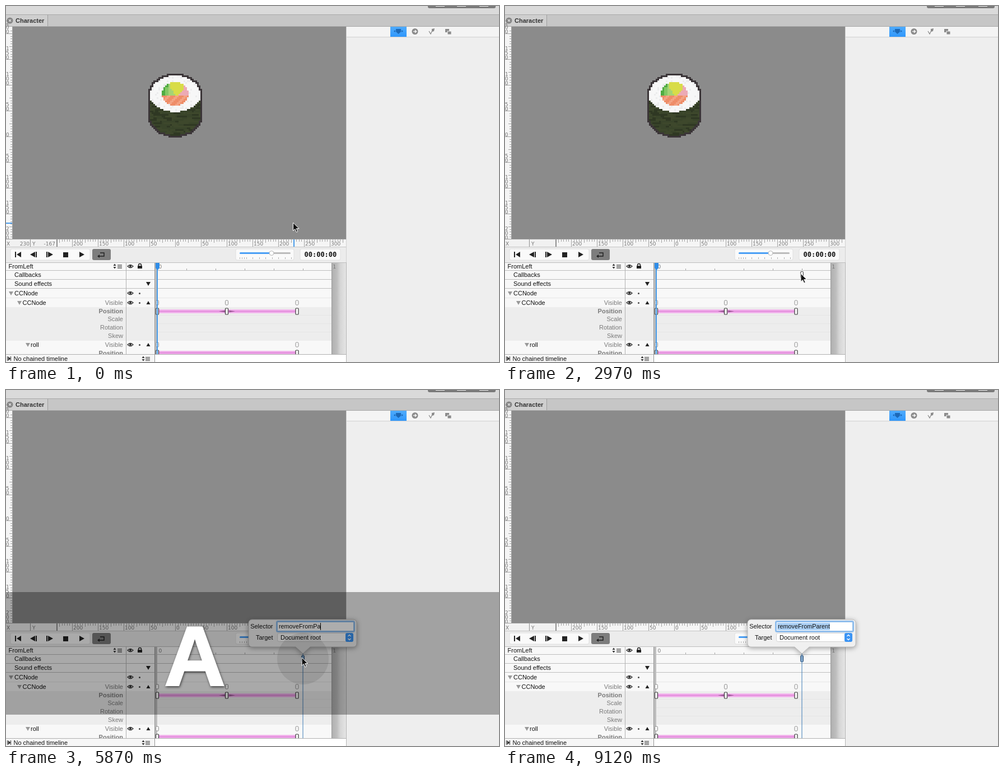
Write an HTML page that moves like this. It is 880 by 636 pixels and loops after 9900 ms.

```html
<!DOCTYPE html>
<html lang="en">
<head>
<meta charset="utf-8">
<title>Timeline callback</title>
<style>
html, body { margin: 0; width: 100%; height: 100%; overflow: hidden; background: #eee; }
svg { display: block; width: 880px; height: 636px; }
text { font-family: "Liberation Sans", Arial, sans-serif; font-size: 11px; fill: #111; white-space: pre; }
.num { font: 9px "DejaVu Sans", sans-serif; fill: #777; }
.clock { font: bold 12px "DejaVu Sans Mono", monospace; fill: #111; }
.prop { fill: #7b7b7b; }
.key { font-size: 151px; font-weight: bold; fill: #fff; stroke: #fff; stroke-width: 3; }
</style>
</head>
<body>
<svg id="stage" viewBox="0 0 880 636"></svg>
<script>
const LOOP = 9900;
const stage = document.getElementById('stage');

const rect = (x, y, w, h, fill, more = '') =>
  `<rect x="${x}" y="${y}" width="${w}" height="${h}" fill="${fill}" ${more}/>`;
const path = (d, fill, more = '') => `<path d="${d}" fill="${fill}" ${more}/>`;
const line = (d, color, w = 1) => path(d, 'none', `stroke="${color}" stroke-width="${w}"`);
const dot = (x, y, r, fill, more = '') => `<circle cx="${x}" cy="${y}" r="${r}" fill="${fill}" ${more}/>`;
const text = (x, y, s, more = '') => `<text x="${x}" y="${y}" ${more}>${s}</text>`;
const END = 'text-anchor="end"';
const range = (a, b) => Array.from({ length: b - a + 1 }, (_, i) => a + i);

function randomizer(seed) {
  return () => (seed = (seed * 16807) % 2147483647) / 2147483647;
}

// Pixel-art sushi roll, 3px cells
function sushi() {
  const rnd = randomizer(77);
  const oval = (x, y, cx, cy, rx, ry) => ((x - cx) / rx) ** 2 + ((y - cy) / ry) ** 2 < 1;
  const solid = (x, y) => Math.abs(x - 302) < 48 &&
    (y < 157 ? oval(x, y, 302, 157, 48.5, 36) : y < 198 || oval(x, y, 302, 198, 48.5, 36.5));
  const around = [-3, 0, 3];
  const edge = (x, y) => around.some(dx => around.some(dy => !solid(x + dx, y + dy)));
  const filling = (x, y) => {
    if (y > 160) return (x + y) % 15 < 4 ? '#f3a384' : '#ee8d68';
    if (Math.abs(x - 306) < 12 - Math.max(0, y - 147) * 0.75) return '#d8dc48';
    if (x > 306) return '#ecaab5';
    return x < 284 || (x < 291 && y < 146) ? '#4fac42' : x < 291 ? '#82c763' : '#a5d375';
  };
  let out = '', wet = 0;
  for (let y = 122.5; y < 235; y += 3) {
    for (let x = 255.5; x < 350; x += 3) {
      if (!solid(x, y)) continue;
      const r = rnd();
      if (r < 0.35) wet = Math.floor(rnd() * 3);
      let c = ['#39442a', '#2f3823', '#3e482c'][wet];
      if (edge(x, y)) c = '#3b3538';
      else if (oval(x, y, 302, 157, 24, 21)) c = filling(x, y);
      else if (oval(x, y, 302, 156, 47, 33)) c = r < 0.15 ? '#ececed' : '#f7f7f7';
      out += rect(x - 1.5, y - 1.5, 3, 3, c);
    }
  }
  return `<g id="sushi" shape-rendering="crispEdges">${out}</g>`;
}

function topBars() {
  return rect(0, 0, 880, 636, '#eee') + rect(0, 0, 880, 15, '#dadada') +
    rect(753, -6, 121, 10, '#7a7a7a', 'rx="3"') +
    [767, 805, 845].map(x => rect(x, 0, 16, 1, '#eee')).join('') +
    rect(0, 15, 880, 1, '#a9a9a9') + rect(0, 16, 880, 20, '#c6c6c6') +
    rect(0, 16, 74, 20, '#cfcfcf') + rect(74, 16, 1, 20, '#9f9f9f') + rect(0, 36, 880, 1, '#a8a8a8') +
    dot(7, 26, 5.5, '#858585') + line('M5 24l4 4m0-4l-4 4', '#ddd', 1.4) +
    text(17, 30, 'Character', 'font-weight="bold" style="fill:#333"');
}

function sidePanel() {
  return rect(607, 37, 273, 18, '#f4f4f4') + rect(607, 55, 273, 1, '#d0d0d0') +
    rect(607, 37, 1, 599, '#d2d2d2') + rect(686, 37, 29, 18, 'url(#tab)') +
    path('M696 41h9v5l-4.500 4l-4.500-4z', '#1c69b8') + path('M692 45l3-2v4zM709 45l-3-2v4z', '#1c69b8') +
    dot(730, 45.5, 5.5, '#8a8a8a') + line('M727 45.500h5m-2-2.500l2.500 2.500l-2.500 2.500', '#f4f4f4', 1.5) +
    line('M755 45l3 5l4-8', '#8a8a8a', 1.3) + path('M760 41l5-1l-1 5l-4 1z', '#8a8a8a') +
    rect(784, 41, 7, 6, '#8a8a8a') + rect(788, 45, 7, 6, '#8a8a8a', 'stroke="#f4f4f4"');
}

function rulers() {
  let s = rect(0, 37, 11, 379, '#f5f5f5') + rect(11, 37, 1, 379, '#a5a5a5');
  for (const k of range(-41, 39)) {
    const y = Math.round(233 + k * 4.6);
    if (y < 38 || y > 415) continue;
    const len = k % 10 === 0 ? 11 : k % 5 === 0 ? 5 : 3;
    s += rect(11 - len, y, len, 1, '#a2a2a2');
  }
  for (const k of range(-4, 4)) {
    const digits = String(Math.abs(k * 50));
    [...digits].forEach((c, i) => {
      s += text(0, 233 + k * 46 - (digits.length - 1 - i) * 7.8, c, 'class="num"');
    });
  }
  s += rect(0, 416, 607, 15, '#f5f5f5') + rect(0, 416, 607, 1, '#9c9c9c') + rect(0, 430, 607, 1, '#c4c4c4');
  for (const k of range(-45, 65)) {
    const x = Math.round(302 + k * 4.6);
    if (x < 92 || x > 605) continue;
    s += rect(x, 417, 1, k % 10 === 0 ? 13 : k % 5 === 0 ? 6 : 4, '#a2a2a2');
  }
  for (const k of range(-4, 6)) s += text(304 + k * 46, 428, Math.abs(k * 50), 'class="num"');
  return s + rect(0, 417, 91, 13, '#f1f1f1') + rect(43, 417, 1, 13, '#8f8f8f') + rect(90, 417, 2, 13, '#8f8f8f') +
    text(1, 428, 'X', 'class="num"') + text(47, 428, 'Y', 'class="num"') +
    `<g id="readout"><text id="rx" class="num" x="42" y="428" ${END}></text>` +
    `<text id="ry" class="num" x="88" y="428" ${END}></text>` +
    rect(0, 0, 11, 2, '#4a9ceb', 'id="markY"') + rect(0, 417, 2, 13, '#4a9ceb', 'id="markX"') + '</g>';
}

function controls() {
  const ink = '#222';
  const box = (x, w) => rect(x, 434, w, 20, '#fafafa', 'rx="3" stroke="#e0e0e0"');
  let s = rect(0, 431, 607, 27, '#ececec') + box(8, 142) +
    rect(154, 434, 33, 20, '#7d7d7d', 'rx="3"') +
    line('M166 447h9v-6h-7', '#222', 1.5) + path('M163 447l4-3v6z', ink) +
    rect(16, 439, 2, 10, ink) + path('M27 439v10l-8-5z', ink) +
    path('M52 439v10l-9-5z', ink) + rect(53, 439, 2, 10, ink) +
    rect(72, 439, 2, 10, ink) + path('M75 439v10l9-5z', ink) +
    rect(102, 440, 9, 9, ink) + path('M131 439v10l9-5z', ink) +
    box(410, 104) + rect(417, 440, 57, 3, '#4a9ff5', 'rx="1.5"') + rect(474, 440, 34, 3, '#bcbcbc', 'rx="1.5"');
  for (const i of range(0, 8)) s += rect(417 + Math.round(i * 11.5), 449, 1, 3, '#b0b0b0');
  for (const i of range(1, 2)) s += rect(417 + i * 4, 449, 1, 3, '#b0b0b0');
  return s + dot(474, 441.5, 4, '#fff', 'stroke="#b5b5b5"') + box(525, 72) + text(532.5, 448, '00:00:00', 'class="clock"');
}

const eye = y => line(`M217 ${y}q5-5 10 0q-5 5-10 0z`, '#333', 1.3) + dot(222, y - 0.3, 2, '#333');
const stepper = (x, y) => path(`M${x - 2.5} ${y - 1}h5l-2.500-3.500zM${x - 2.5} ${y + 1}h5l-2.500 3.500z`, '#333');
const menu = (x, y) => [-3, -1, 1, 3].map(d => rect(x - 4, y + d, 8, 1, '#555')).join('');
const arrowDown = (x, y, c) => path(`M${x - 4} ${y - 3}h8l-4 7z`, c);
const arrowUp = (x, y) => path(`M${x - 3.5} ${y + 3}h7l-3.500-6z`, '#222');
const hollow = (x, y) => rect(x - 2.5, y - 4, 5, 8, '#fafafa', 'rx="1.5" stroke="#8d8d8d"');
const keyframe = (x, y) => rect(x - 2.5, y - 5.5, 5, 11, '#fff', 'rx="1" stroke="#3a3a3a" stroke-width="1.2"');
const tween = y => rect(270, y, 250, 7, '#f3b9ee') + rect(270, y + 2, 250, 3, '#e795e0');

function timeline() {
  const sep = y => rect(0, y, 607, 1, '#bdbdbd');
  let s = rect(0, 458, 607, 164, '#f8f8f8') + rect(0, 538, 607, 60, '#ededed');
  for (const y of [552, 567, 582]) s += rect(266, y, 341, 1, '#e5e5e5');
  s += [458, 472, 488, 504].map(sep).join('') + rect(0, 521, 607, 1, '#e6e6e6');
  s += rect(582, 459, 25, 163, 'url(#past)') + rect(581, 459, 1, 163, '#9a9a9a');
  s += rect(214, 459, 1, 163, '#b2b2b2') + rect(265, 459, 1, 163, '#979797') + rect(266, 459, 4, 163, '#bebebe');
  s += text(4.5, 469, 'FromLeft') + stepper(194, 465) + menu(203, 465) + eye(465) +
    rect(235, 464, 8, 5, '#222') + line('M236.500 464v-1a2.500 2.500 0 0 1 5 0v1', '#222', 1.4) +
    text(15, 484, 'Callbacks') + text(15, 500, 'Sound effects') + arrowDown(254, 496, '#222') +
    arrowDown(9, 513, '#999') + text(15, 517, 'CCNode') + eye(513) + dot(238.5, 513.5, 1.5, '#444') +
    arrowDown(24, 530, '#999') + text(29.5, 534, 'CCNode') + arrowDown(39, 605, '#999') + text(44, 609, 'roll');
  for (const y of [530, 605]) {
    s += eye(y) + dot(238.5, y + 0.5, 1.5, '#444') + arrowUp(254, y) + text(209, y + 4, 'Visible', `class="prop" ${END}`) +
      text(209, y + 19, 'Position', `class="prop" font-weight="bold" ${END}`);
  }
  ['Scale', 'Rotation', 'Skew'].forEach((n, i) => s += text(209, 563.3 + i * 14.7, n, `class="prop" ${END}`));
  s += text(272.5, 469, '0', 'class="num"') + text(583.5, 469, '1', 'class="num"');
  for (const i of range(1, 5)) s += rect(270 + i * 52, 469, 1, 3, '#a5a5a5');
  s += tween(542) + tween(616) + path('M380 545.500l11-2v4zM409 545.500l-11-2v4z', '#7d3f78', 'opacity=".65"');
  s += [270, 394, 519.5].map(x => hollow(x, 530) + keyframe(x, 545.5)).join('') +
    [270, 519.5].map(x => hollow(x, 605) + keyframe(x, 620.5)).join('');
  s += `<g id="callback">${rect(527.5, 474.5, 5, 11, '#eee', 'id="cbBox" rx="1" stroke="#444"')}</g>`;
  s += `<g id="headStart">${rect(269, 470, 2, 152, '#469be8')}${path('M267 459h7v9l-3.500 4l-3.500-4z', '#2f8de8')}</g>`;
  s += rect(529.5, 465, 1, 157, '#3f7db5', 'id="headEnd"');
  return s + rect(0, 622, 265, 14, '#f6f6f6') + rect(266, 622, 341, 14, '#fff') + rect(0, 622, 607, 1, '#b0b0b0') +
    rect(265, 622, 1, 14, '#979797') + rect(607, 458, 1, 178, '#b5b5b5') +
    rect(2, 626, 1, 8, '#222') + path('M4 626v8l4-4z', '#222') + rect(8, 626, 1, 8, '#222') +
    text(13.5, 634, 'No chained timeline') + stepper(245, 630) + menu(253, 630);
}

function popover() {
  const shape = 'M439 410H620a6 6 0 0 1 6 6V453a6 6 0 0 1-6 6H543L530 471L517 459H439a6 6 0 0 1-6-6V416a6 6 0 0 1 6-6z';
  return `<g id="popover">` +
    path(shape, '#f0f0f0', 'stroke="#bdbdbd" style="filter:drop-shadow(0 2px 4px rgba(0,0,0,.35))"') +
    text(476.5, 426, 'Selector', END) + text(476.5, 445.5, 'Target', END) +
    rect(483.5, 413.5, 138, 18, '#fff', 'rx="2" stroke="#8fbdec" stroke-width="3"') +
    rect(486, 416, 94, 13, '#abd0f5', 'id="selection"') +
    '<text id="typed" x="487" y="426" style="font-size:10.8px"></text>' +
    rect(0, 416, 1, 13, '#000', 'id="caret"') +
    rect(484.5, 434.500, 135, 15, '#fff', 'rx="3" stroke="#d2d2d2"') + rect(606, 434, 14, 16, '#3b94f4', 'rx="3"') +
    line('M610.500 440l2.500-2.500l2.500 2.500M610.500 444l2.500 2.500l2.500-2.500', '#fff', 1.4) +
    text(490, 445.5, 'Document root') + '</g>';
}

stage.innerHTML = `<defs><linearGradient id="past"><stop offset="0" stop-color="#b0b0b0"/>
  <stop offset=".35" stop-color="#bebebe"/><stop offset=".6" stop-color="#d6d6d6"/>
  <stop offset="1" stop-color="#e4e4e4"/></linearGradient>
  <linearGradient id="tab" x2="0" y2="1"><stop offset="0" stop-color="#4fabfc"/>
  <stop offset="1" stop-color="#2f97fb"/></linearGradient></defs>` +
  topBars() + rect(12, 37, 595, 379, '#8b8b8b') + sushi() + sidePanel() + rulers() + controls() + timeline() + popover() +
  `<g id="overlay">${rect(0, 361, 880, 219, '#000', 'id="shade"')}${dot(530, 480, 46, '#000', 'id="spot"')}<g id="keys"></g></g>` +
  dot(530, 479.5, 12, '#000', 'id="click" opacity=".15"') +
  path('M0 0V14.500L3.400 11.400L5.800 17L8.200 16L5.800 10.600H10.500Z', '#111', 'id="cursor" stroke="#fff"');

const ui = {};
stage.querySelectorAll('[id]').forEach(n => ui[n.id] = n);

const SHIFT = 'M334 412L409 488H372V528H296V488H259ZM334 432L291 475H308V515H360V475H377Z';

function keyShape(k) {
  if (k === 'option') return line('M274 427H311L356 521H394M346 427H394', '#fff', 12);
  if (k === 'return') return line('M305 474.500H362A27 27 0 0 0 362 420.500H348', '#fff', 13) + path('M273 474.500L307 441V509Z', '#fff');
  if (k === '^') return path(SHIFT, '#fff', 'fill-rule="evenodd"');
  if (k[0] === '^') {
    const left = k === '^F' ? 211 : 207;
    return `<g transform="translate(${left + 5 - 259})">${keyShape('^')}</g>` + text(left + 158, 526.5, k[1], 'class="key"');
  }
  return text(337, 526.5, k, 'class="key" text-anchor="middle"');
}

// Tables hold [start time, value, ...]; the latest started row applies
const at = (rows, t) => rows.reduce((hit, row) => (row[0] <= t ? row : hit));

const FADE = [[0, 0], [990, 0.1], [1110, 0.6], [1230, 1], [2200, 0.16], [2320, 0], [4040, 0.5], [4150, 1],
  [6820, 0.88], [6940, 0], [7840, 0.83], [7950, 1], [8310, 0.84], [8460, 0.15], [8580, 0]];
const POINTER = [[0, 512.5, 387], [360, 512, 407], [570, 561, 465], [690, 527, 456], [840, 566, 417], [990, 525, 428],
  [1110, 502, 446], [1230, 496, 424], [1380, 556, 442], [1500, 518, 468], [1610, 528, 478],
  [8730, 505, 439], [8850, 640, 530], [8970, 811, 627]];
const WORD = 'removeFromParent';
const TYPING = [[0, 0, 'option'], [4040, 1, 'R'], [4150, 2, 'RE'], [4300, 4, 'MO'], [4440, 5, 'OV'], [4560, 6, 'VE'],
  [4920, 6, '^'], [5030, 7, '^F'], [5150, 9, 'RO'], [5270, 10, 'OM'], [5630, 11, '^P'], [5870, 12, 'A'],
  [5990, 13, 'AR'], [6110, 14, 'RE'], [6230, 15, 'EN'], [6350, 16, 'NT'], [7840, 16, 'return']];
const POP = [[0, 0, 0.5], [2980, 0.5, 0.7], [3100, 1, 1.05], [3220, 1, 1]];

const show = (n, on) => n.setAttribute('display', on ? 'inline' : 'none');
let lastKey = '';

function draw(t) {
  const [, x, y] = at(POINTER, t);
  show(ui.cursor, t < 9120);
  ui.cursor.setAttribute('transform', `translate(${x} ${y})`);
  show(ui.readout, t < 570);
  ui.rx.textContent = Math.round((x - 301) / 0.92);
  ui.ry.textContent = Math.round((233.5 - y) / 0.92);
  ui.markX.setAttribute('x', Math.round(x));
  ui.markY.setAttribute('y', y);

  const opened = t >= 2980;
  show(ui.sushi, !opened);
  show(ui.headStart, !opened);
  show(ui.headEnd, opened);
  show(ui.callback, t >= 1840);
  ui.cbBox.setAttribute('fill', opened ? '#9db9d6' : '#eee');
  ui.cbBox.setAttribute('stroke', opened ? '#27496d' : '#444');
  show(ui.click, (t >= 1840 && t < 1960) || (t >= 2680 && t < 2860));

  const [, alpha, size] = at(POP, t);
  ui.popover.setAttribute('opacity', alpha);
  ui.popover.setAttribute('transform', `translate(530 471) scale(${size}) translate(-530 -471)`);
  show(ui.popover, opened);

  const [, count, key] = at(TYPING, t);
  ui.typed.textContent = WORD.slice(0, count);
  show(ui.selection, t >= 7840);
  show(ui.caret, opened && t < 7480);
  ui.caret.setAttribute('x', 487 + (opened && count ? Math.round(ui.typed.getComputedTextLength()) : 0));

  const fade = at(FADE, t)[1];
  show(ui.overlay, fade > 0);
  ui.shade.setAttribute('opacity', 0.323 * fade);
  ui.spot.setAttribute('opacity', 0.09 * fade);
  ui.keys.setAttribute('opacity', Math.min(1, fade * 4));
  ui.keys.style.filter = `drop-shadow(1px 2px 2px rgba(0,0,0,${0.6 * fade}))`;
  if (key !== lastKey) ui.keys.innerHTML = keyShape(lastKey = key);
}

const start = performance.now();
function tick() {
  draw((performance.now() - start) % LOOP);
  requestAnimationFrame(tick);
}
tick();
</script>
</body>
</html>
```
